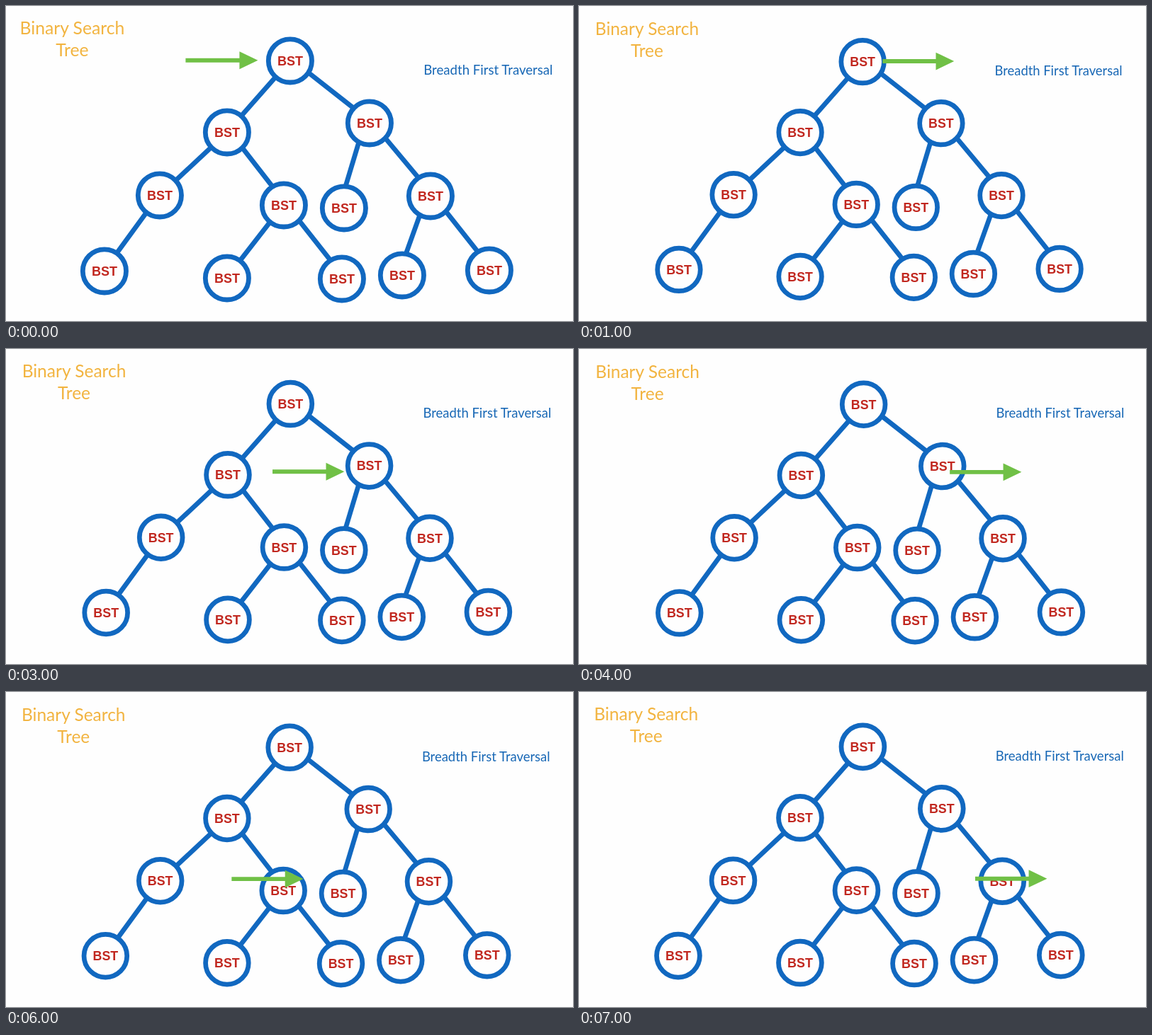
These frames come from a looping animation (800x445 px, 8 s). An HTML page:

```html
<!DOCTYPE html>
<html lang="en">
<head>
<meta charset="utf-8">
<title>Breadth First Traversal</title>
<style>
  html, body { margin: 0; width: 100%; height: 100%; overflow: hidden; background: #fefefe; }
  svg { display: block; width: 800px; height: 445px; }
  text { text-anchor: middle; font-family: Lato, sans-serif; }
  .title { font-size: 24.7px; fill: #f2b440; }
  .caption { font-size: 18.6px; fill: #1767b5; }
  .label { font: bold 18px "Liberation Sans", Arial, sans-serif; fill: #c1271f; }
  circle, line { stroke: #1168c0; stroke-width: 6.8px; }
  circle { fill: #fefefe; }
</style>
</head>
<body>
<svg viewBox="0 0 800 445">
  <g id="scene">
    <text class="title" x="93" y="40">Binary Search</text>
    <text class="title" x="93" y="71">Tree</text>
    <text class="caption" x="680" y="97">Breadth First Traversal</text>
    <g id="tree" transform="translate(.5 .6)"></g>
    <path id="arrow" fill="#70c046" d="M0-3H76V-12.5L102 0L76 12.5V3H0Z"/>
  </g>
</svg>
<script>
const byId = id => document.getElementById(id);
const node = (x, y, ...children) => ({ x, y, children });

const tree = node(400, 77,
  node(311, 178,
    node(216, 267, node(138, 374)),
    node(391, 281, node(311, 384), node(473, 385))),
  node(512, 165,
    node(476, 285),
    node(598, 268, node(558, 380), node(681, 373))));

// Branches sit a little outside the line between the centres
function branch(from, to) {
  const dx = to.x - from.x, dy = to.y - from.y;
  const shift = dx > 0 ? 4.5 : 3 + 3 * dy / dx;
  return `<line x1="${from.x + shift}" y1="${from.y}" x2="${to.x + shift}" y2="${to.y}"/>`;
}

// Branches come before the circle, so each node covers its own ends
function render(n) {
  return n.children.map(child => branch(n, child) + render(child)).join("") +
    `<circle cx="${n.x}" cy="${n.y}" r="30.6"/>
     <text class="label" x="${n.x}" y="${n.y + 6.5}">BST</text>`;
}

// The arrow sweeps each level at a steady speed (px per second)
const sweeps = [
  { start: 0, x: 253, y: 77, speed: 176 },
  { start: 2, x: 227, y: 174, speed: 148 },
  { start: 5, x: 76, y: 265, speed: 242 }
];

function draw() {
  const t = Math.floor(performance.now() / 1000) % 8;

  // Hand-held camera: a fading zoom wobble and a slow sway
  const zoom = 0.993 + 0.007 * Math.cos(t * Math.PI * 5 / 6) / (1 + 0.6 * t);
  const sway = t * Math.PI * 2 / 5;
  const x = 400.4 - 0.8 * Math.sin(sway);
  const y = 224.3 + 0.5 * Math.cos(sway);
  byId("scene").setAttribute("transform",
    `translate(${x} ${y}) scale(${zoom}) translate(-400 -225)`);

  const sweep = sweeps.findLast(s => s.start <= t);
  const arrowX = sweep.x + sweep.speed * (t - sweep.start);
  byId("arrow").setAttribute("transform", `translate(${arrowX} ${sweep.y})`);
  requestAnimationFrame(draw);
}

byId("tree").innerHTML = render(tree);
draw();
</script>
</body>
</html>
```
